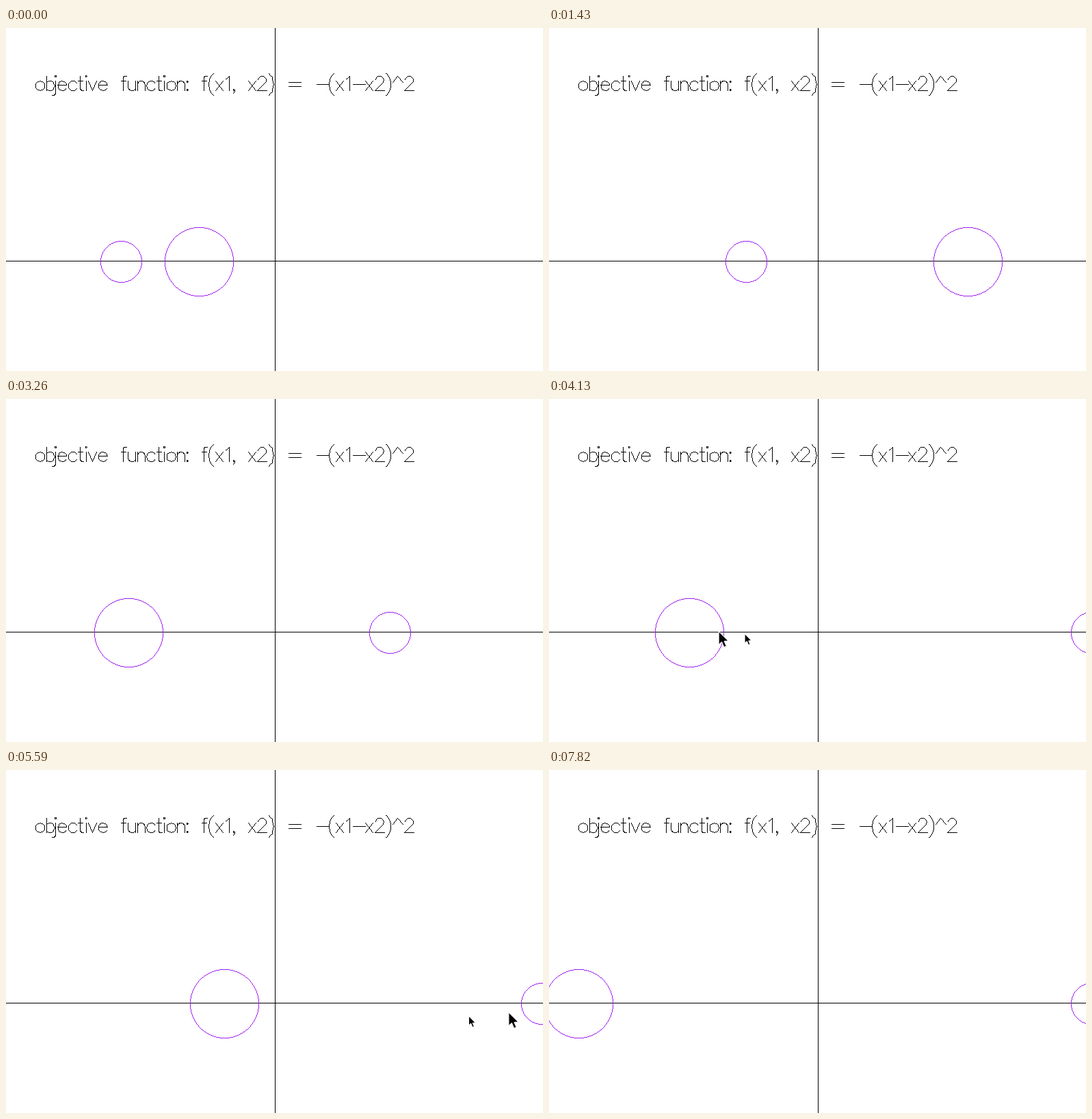
A matplotlib script for the animation above (9270 ms loop, 785 by 501 pixels).

```python
import numpy as np
import matplotlib.pyplot as plt
from matplotlib.animation import FuncAnimation
from matplotlib.colors import to_rgba
from matplotlib.patches import Polygon, Rectangle

W, H, DPI = 785, 501, 64
LOOP, INTERVAL = 9270, 18
STEP = 58.5                        # simulation tick in ms
RATE = 0.125
AXIS_X, AXIS_Y = 393, 340
BIG_LIMITS = AXIS_X - 350, AXIS_X + 350
SMALL_LIMITS = AXIS_X - 400, AXIS_X + 400

# Single-stroke lettering, y up from the baseline

CAP, MID = 21, 14                  # cap height and x-height
TRACKING, SPACE = 2.5, 15


def arc(cx, cy, rx, ry, a0, a1):
    a = np.radians(np.linspace(a0, a1, 17))
    return list(zip(cx + rx * np.cos(a), cy + ry * np.sin(a)))


def bowl(a0, a1, left=0):
    return arc(left + 6.5, MID / 2, 6.5, MID / 2, a0, a1)


def stem(x, top):
    return [(x, top), (x, 0)]


def bar(width, y):
    return [(0, y), (width, y)]


def dot(x, y):
    return arc(x, y, 1, 1, 0, 360)


def flip(stroke, width=None, height=None):
    return [(x if width is None else width - x,
             y if height is None else height - y) for x, y in stroke]


HOOK = [(3, CAP)] + arc(6, 3, 3, 3, 180, 270) + [(8, 0)]
ARCH = [(0, 10)] + arc(5.5, 8.5, 5.5, 5.5, 140, 0) + [(11, 0)]
PAREN = arc(11, 9, 11, 17, 111, 249)

GLYPHS = {
    "o": [bowl(0, 360)],
    "b": [stem(0, CAP), bowl(145, -145, left=-1)],
    "c": [bowl(35, 325)],
    "e": [bar(12, 8), bowl(8, 325)],
    "j": [dot(5, CAP), [(5, MID)] + arc(1, -3, 4, 4, 0, -90) + [(0, -7)]],
    "t": [HOOK, bar(7, MID)],
    "f": [flip(HOOK, height=CAP)[::-1], bar(7, MID)],
    "i": [dot(1, CAP), stem(1, MID)],
    "v": [[(0, MID), (6, 0), (12, MID)]],
    "n": [stem(0, MID), ARCH],
    "u": [flip(s, 11, MID) for s in (stem(0, MID), ARCH)],
    ":": [dot(1, 13), dot(1, 1)],
    ",": [dot(1, 1), [(2, 1), (2, -1), (0, -4)]],
    "x": [[(0, MID), (11, 0)], [(0, 0), (11, MID)]],
    "1": [[(0, 17), (2, 18)] + stem(5, CAP)],
    "2": [arc(7, 15.5, 6, 5.5, 175, -35) + bar(14, 0)],
    "(": [PAREN],
    ")": [flip(PAREN, width=7)],
    "=": [bar(18, 12), bar(18, 6)],
    "-": [bar(18, 9)],
    "^": [[(0, 12), (7.5, CAP), (15, 12)]],
}
BEARING = {"j": (-6, 0), "1": (2, 3), "-": (-1, -2), "=": (2, 4)}


def line_pixels(p, q):
    n = int(max(abs(q[0] - p[0]), abs(q[1] - p[1]))) + 1
    return np.rint(np.linspace(p, q, n)).astype(int)


def text_pixels(text, baseline):
    x, parts = 0, []
    for char in text:
        if char == " ":
            x += SPACE + TRACKING
            continue
        before, after = BEARING.get(char, (0, 0))
        x += before
        for stroke in GLYPHS[char]:
            points = [(round(x + gx), round(baseline - gy)) for gx, gy in stroke]
            parts += [line_pixels(p, q) for p, q in zip(points, points[1:])]
        x += max(gx for stroke in GLYPHS[char] for gx, _ in stroke)
        x += after + TRACKING
    return np.concatenate(parts)


def ring_pixels(radius):
    a = np.arange(int(radius * np.sqrt(0.5)) + 1)
    b = np.rint(np.sqrt(radius ** 2 - a ** 2)).astype(int)
    return np.concatenate([np.stack([sx * u, sy * v], axis=1) + radius
                           for u, v in ((a, b), (b, a))
                           for sx in (-1, 1) for sy in (-1, 1)])


# Motion


def diverge(big, small, ticks):
    """Gradient steps push the two values apart until they hit their limits."""
    for _ in range(min(int(ticks), 20)):
        push = RATE * (big - small)
        big = np.clip(big + push, *BIG_LIMITS)
        small = np.clip(small - push, *SMALL_LIMITS)
    return big, small


ROUNDS = [  # start time, big x, small x
    (0, 282, 168), (1130, 503, 397), (2010, 583, 330), (2900, 320, 420),
]
STOPS = [  # cursor: arrival time, departure time, x, y
    (0, 3300, -40, 437),
    (3765, 3815, 43, 337),
    (4740, 5040, 647, 344),
    (5530, 5560, 791, 352),
    (5890, 5980, 407, 366),
    (6040, 7550, 416, 364),
    (7860, LOOP, 645, 530),
]
GRAB_BIG, RELEASE_BIG, GRAB_SMALL, RELEASE_SMALL = 3815, 4950, 5540, 6222
CURSOR_LEAD, POINTER_LEAD = 47, 87


def cursor_at(t):
    for (_, leave, *a), (arrive, _, *b) in zip(STOPS, STOPS[1:]):
        if t < arrive:
            u = np.clip((t - leave) / (arrive - leave), 0, 1)
            return np.array(a) + np.subtract(b, a) * u * u * (3 - 2 * u)
    return np.array(STOPS[-1][2:])


def circle_positions(t, tick_time):
    if t < GRAB_BIG:
        start, big, small = [r for r in ROUNDS if r[0] <= t][-1]
        return diverge(big, small, (t - start) / STEP)
    held = cursor_at(tick_time)[0]
    if t < RELEASE_BIG:
        return held, SMALL_LIMITS[1]
    if t < RELEASE_SMALL:
        ticks = (min(t, GRAB_SMALL) - RELEASE_BIG) / STEP
        big, small = diverge(647, SMALL_LIMITS[1], ticks)
        return big, (held + 2 if t > GRAB_SMALL else small)
    return diverge(321.5, 418.5, (t - RELEASE_SMALL) / STEP)


# Stage

fig = plt.figure(figsize=(W / DPI, H / DPI), dpi=DPI, facecolor="white")
ax = fig.add_axes([0, 0, 1, 1])
ax.set_xlim(0, W)
ax.set_ylim(H, 0)
ax.axis("off")


def place(image, x, y):
    height, width = image.get_array().shape[:2]
    image.set_extent((x, x + width, y + height, y))


def sprite(pixels, color, x, y, zorder):
    """Crisp image with the given (x, y) pixels filled."""
    rgba = np.tile(to_rgba(color, 0), (*(pixels.max(axis=0) + 1)[::-1], 1))
    rgba[pixels[:, 1], pixels[:, 0], 3] = 1
    image = ax.imshow(rgba, interpolation="nearest", aspect="auto", zorder=zorder)
    place(image, x, y)
    return image


for corner, width, height in (((AXIS_X, 0), 1, H), ((0, AXIS_Y), W, 1)):
    ax.add_patch(Rectangle(corner, width, height, fc="black", lw=0, zorder=1))

FORMULA = "objective function: f(x1, x2) = -(x1-x2)^2"
sprite(text_pixels(FORMULA, baseline=31), "black", 43, 60, zorder=2)

RADII = 50, 30
rings = [sprite(ring_pixels(r), "#a020f0", 0, 0, zorder=3) for r in RADII]

ARROW = np.array([(0, 0), (0, 14), (3.2, 11), (5.5, 16.5), (8, 15.5),
                  (5.7, 10.3), (10, 10)])
cursor, pointer = [
    ax.add_patch(Polygon(ARROW, fc="black", ec="white", lw=72 / DPI, zorder=z))
    for z in (4, 5)]


def update(frame):
    t = frame * INTERVAL + INTERVAL - 1
    tick_time = 4130 + np.floor((t - 4130) / STEP) * STEP
    for ring, radius, x in zip(rings, RADII, circle_positions(t, tick_time)):
        place(ring, round(x) - radius, AXIS_Y + 1 - radius)
    cursor.set_xy(ARROW * 1.4 + cursor_at(tick_time + CURSOR_LEAD))
    pointer.set_xy(ARROW + cursor_at(tick_time + POINTER_LEAD) + (0, 3))
    return *rings, cursor, pointer


anim = FuncAnimation(fig, update, frames=LOOP // INTERVAL, interval=INTERVAL,
                     repeat=True, repeat_delay=0)
plt.show()
```
